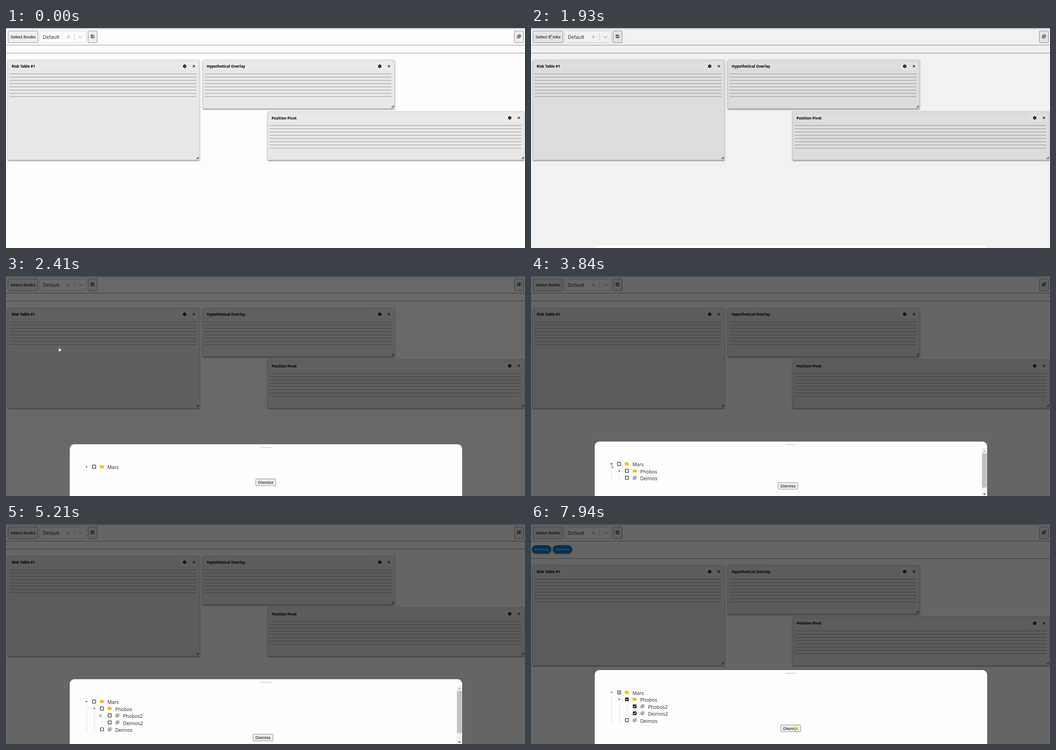
Write an HTML page that moves like this. It is 1148x488 px and loops after 8 s.

```html
<!DOCTYPE html>
<html>
<head>
<meta charset="utf-8">
<style>
html, body { margin: 0; width: 1148px; height: 488px; overflow: hidden; background: #fdfdfd; }
svg { display: block; }
text { white-space: pre; }
.ui { font: 10.7px "Open Sans", "Noto Sans", sans-serif; fill: #222; }
.title { font: 700 8.05px "Open Sans", "Noto Sans", sans-serif; }
.pill { font: 7.6px "Open Sans", "Noto Sans", sans-serif; fill: #fff; }
.btn { font: 9.56px "Liberation Sans", Arial, sans-serif; text-anchor: middle; }
</style>
</head>
<body>
<svg id="stage" width="1148" height="488" viewBox="0 0 1148 488"></svg>
<script>
const LOOP = 8000;
const stage = document.getElementById('stage');

const STEPS = [0, 280, 440, 610, 770, 1080, 1250, 1420, 1590, 1760, 1930, 2160, 2410, 2650, 2900, 3140,
  3350, 3520, 3680, 3840, 4030, 4210, 4420, 4580, 4740, 4900, 5060, 5210, 5400, 5570, 5740, 5900,
  6070, 6230, 6400, 6560, 7010, 7170, 7320, 7480, 7630, 7790, 7940];

// Keys are [time, value, value...]
const POINTER = [[280, 440, 246], [770, 280, 115], [1590, 45, 15], [2160, 45, 15], [2410, 118, 158],
  [2900, 172, 400], [3140, 178, 421], [3840, 178, 419], [4210, 178, 419], [4740, 194, 420],
  [5060, 195, 421], [5210, 207, 421], [5400, 210, 405], [5740, 211, 392], [6560, 211, 387], [7940, 587, 452]];
const SHEET = [[1760, 488], [1930, 482], [2160, 406], [2410, 373.3], [2650, 369], [3680, 369], [3840, 367.2],
  [4030, 357.5], [4210, 355], [5060, 355], [5210, 344.3], [5400, 328], [5570, 324]];
const DIM = [[1760, 0], [1930, .047], [2160, .42], [2410, .59], [2650, .6]];
const OPEN_MARS = 3840, OPEN_PHOBOS = 5210, CHECKED = 6230;

function at(keys, t) {
  const i = keys.findIndex(k => k[0] > t);
  if (i === 0) return keys[0].slice(1);
  if (i < 0) return keys[keys.length - 1].slice(1);
  const a = keys[i - 1], b = keys[i], p = (t - a[0]) / (b[0] - a[0]);
  return a.slice(1).map((v, n) => v + (b[n + 1] - v) * p);
}

const rect = (x, y, w, h, fill, more = '') => `<rect x="${x}" y="${y}" width="${w}" height="${h}" fill="${fill}" ${more}/>`;
const line = (d, color, width = 1) => `<path d="${d}" fill="none" stroke="${color}" stroke-width="${width}"/>`;
const text = (x, y, s, cls) => `<text x="${x}" y="${y}" class="${cls}">${s}</text>`;
const move = (x, y, body) => `<g transform="translate(${x} ${y})">${body}</g>`;
const button = (x, y, w, h, body = '') =>
  rect(x + .5, y + .5, w - 1, h - 1, '#efefef', 'stroke="#808080" stroke-width=".9" rx="1.5"') + body;
const cross = (r, color, width) => line(`M${-r} ${-r}L${r} ${r}M${r} ${-r}L${-r} ${r}`, color, width);

const teeth = Array.from({ length: 6 }, (_, i) => rect(-1, -4, 2, 3, '#111', `transform="rotate(${i * 60})"`)).join('');
const gear = teeth + '<circle r="2.1" fill="none" stroke="#111" stroke-width="1.7"/>';
const floppy = line('M-3.3-3.3H2L3.3-2V3.3H-3.3Z', '#111') + rect(-2.2, -2.2, 3.2, 1.4, '#111') + '<circle cy="1.2" r="1.1"/>';
const addIcon = line('M-1.7-3.6H3.6V1.7H-1.7ZM-3.7-2V3.7H2M1-2.5V.7M-.6-.9H2.6', '#111', .9);
const leaf = line('M-2-3.5H3.6V2H-2ZM-3.6-2V3.6H2M-.6-1.8H2.4M-.6-.6H2.4M-.6.6H1.4', '#555', .8);
const folder = '<path d="M-4.5-3.7H-1L0-2.6H4.5V3.5H-4.5Z" fill="#f6c02c"/>';
const openFolder = '<path d="M-4.5-3.7H-1L0-2.6H4V-1H-2.6L-4.5 3Z" fill="#eca91c"/><path d="M-2.6-1.2H5L3.6 3.5H-4.5Z" fill="#fabd28"/>';
const arrow = '<path d="M0 0V6.6L1.5 5.3 2.5 7.5 3.5 7 2.5 4.9H4.5Z" fill="#fff" stroke="#444" stroke-width=".6"/>';
const hand = '<path d="M-.8.5Q0-.6.8.5V3.4L4 4.2V6.6L3 9H-1L-3.2 5.6Q-2.8 4.4-.8 5.6Z" fill="#fff" stroke="#444" stroke-width=".6"/>';

function panel(x, y, w, h, title) {
  let s = rect(.5, .5, w - 1, h - 1, '#e8e8e8', 'rx="2" stroke="#cfcfcf" filter="url(#shadow)"');
  s += rect(4.5, 5, w - 9, 20, '#e9e9e9', 'stroke="#dedede" stroke-width=".8"');
  s += rect(w - 43, 5, 20, 20, '#ececec') + rect(w - 22.5, 5, 18, 20, '#ececec');
  s += text(9, 18, title, 'title') + move(w - 33.3, 14.8, gear) + move(w - 13, 14.8, cross(2.4, '#111', 1.1));
  for (let i = 0; i < 8; i++) s += line(`M4.5 ${31.8 + i * 7.2}H${w - 7.5}`, '#8c8c8c', .9);
  return move(x, y, s + line(`M${w - 3} ${h - 8}V${h - 3.5}H${w - 7.5}`, '#444', 1.3));
}

function toolbar() {
  return line('M0 1.5H1148M0 38H1148', '#8c8c8c', 1.1) +
    button(4, 6, 67, 27, text(37.5, 23, 'Select Books', 'btn')) +
    rect(74.5, 6.5, 103, 26, '#fdfdfd', 'stroke="#ccc" rx="3"') + text(81.5, 24.4, 'Default', 'ui') +
    move(138, 19.8, cross(2.8, '#bbb', 1.4)) + line('M151.5 12V27', '#ccc') + line('M160.8 18L164.8 22L168.8 18', '#bbb', 1.5) +
    button(181, 6, 21, 27, move(191.5, 18.6, floppy)) + button(1124, 6, 21, 27, move(1134.6, 18.6, addIcon));
}

function pill(x, label) {
  return rect(x, 47, 43, 18, '#0c7ccf', 'rx="9" filter="url(#shadow)"') + text(x + 6, 58.8, label, 'pill');
}

function page(checked) {
  const shift = checked ? 20.8 : 0;
  return toolbar() + (checked ? pill(2, 'Phobos2') + pill(48, 'Deimos2') : '') +
    move(0, shift, line('M0 55.7H1148', '#8c8c8c', 1.1) +
      panel(3.5, 70, 425, 223, 'Risk Table #1') +
      panel(435, 70, 425, 109, 'Hypothetical Overlay') +
      panel(578.5, 184.5, 569, 108.5, 'Position Pivot'));
}

function checkbox(state) {
  const on = state === 'on';
  return rect(-3.5, -3.5, 7, 7, on ? '#111' : '#fff', 'rx=".6" stroke="#222" stroke-width="1.2"') +
    (on ? line('M-2.3 0L-.7 1.7L2.5-1.8', '#fff', 1.2) : '') + (state === 'part' ? line('M-2 0H2', '#111', 1.2) : '');
}

// A node without `open` is a leaf.
function treeRow({ label, depth, open, state }, i) {
  const isLeaf = open === undefined, x = depth * 17.15;
  let s = '';
  for (let k = 0; k < depth + (isLeaf ? 1 : 0); k++) s += line(`M${178.5 + k * 17.15} -6.5v15.4`, '#d5d5d5', .8);
  if (!isLeaf) s += move(x + 178, 0, line(open ? 'M-2-1.5L0 .5L2-1.5' : 'M-1-2L1 0L-1 2', '#222', 1.1));
  s += move(x + 195, -.2, checkbox(state)) + move(x + 212.2, -.2, isLeaf ? leaf : open ? openFolder : folder);
  return move(0, 49.8 + i * 15.4, s + text(x + 224.4, 5.2, label, 'ui'));
}

function scrollbar(top, hidden) {
  const y = top + 14, view = 488 - y, track = view - 22;
  const thumb = track * view / (view + hidden);
  return rect(997, y, 12, view, '#f1f1f1') + rect(997.5, y + 12, 11, thumb, '#c1c1c1') +
    `<path d="M1000 ${y + 8.5}l3-3.2l3 3.2z" fill="#a3a3a3"/><path d="M1000 ${482.5}l3 3.2l3-3.2z" fill="#505050"/>`;
}

function sheet(t) {
  const [top] = at(SHEET, t);
  const mars = t >= OPEN_MARS, phobos = t >= OPEN_PHOBOS;
  const on = t >= CHECKED ? 'on' : '';
  const rows = [{ label: 'Mars', depth: 0, open: mars, state: on && 'part' }];
  if (mars) rows.push({ label: 'Phobos', depth: 1, open: phobos, state: on });
  if (phobos) rows.push({ label: 'Phobos2', depth: 2, state: on }, { label: 'Deimos2', depth: 2, state: on });
  if (mars) rows.push({ label: 'Deimos', depth: 1 });
  const rest = phobos ? 324 : mars ? 355 : 369;
  const scrolls = mars && top - rest > 1;
  const bx = scrolls ? 546 : 552, by = 445.3 - rest;
  return move(0, top, rect(141, 0, 868, 300, '#fefefe', 'rx="10"') + rect(562, 6, 25.5, 2, '#d8d8d8', 'rx="1"') +
    rows.map(treeRow).join('') + button(bx, by, 45, 16, text(bx + 22.5, by + 11.2, 'Dismiss', 'btn'))) +
    (scrolls ? scrollbar(top, top - rest) : '');
}

function pointer(t) {
  const isHand = t >= 1590 && t < 2650 || t >= 7790;
  const glow = t >= 7940 ? '<circle cx="0" cy="1.5" r="4.6" fill="#ffee00" opacity=".75"/>' : '';
  return move(...at(POINTER, t), glow + (isHand ? hand : arrow));
}

const defs = '<defs><filter id="shadow" x="-5%" y="-10%" width="110%" height="130%">' +
  '<feDropShadow dx="0" dy="2" stdDeviation="1.6" flood-opacity=".4"/></filter></defs>';

function scene(t) {
  return defs + rect(0, 0, 1148, 488, '#fdfdfd') + page(t >= CHECKED) +
    rect(0, 0, 1148, 488, '#000', `opacity="${at(DIM, t)[0]}"`) +
    (t >= 1930 ? sheet(t) : '') + (t >= 280 ? pointer(t) : '');
}

let shown = -1;
function tick(now) {
  const t = now % LOOP;
  const step = STEPS.filter(s => s <= t).pop();
  if (step !== shown) stage.innerHTML = scene(shown = step);
  requestAnimationFrame(tick);
}
tick(0);
</script>
</body>
</html>
```
